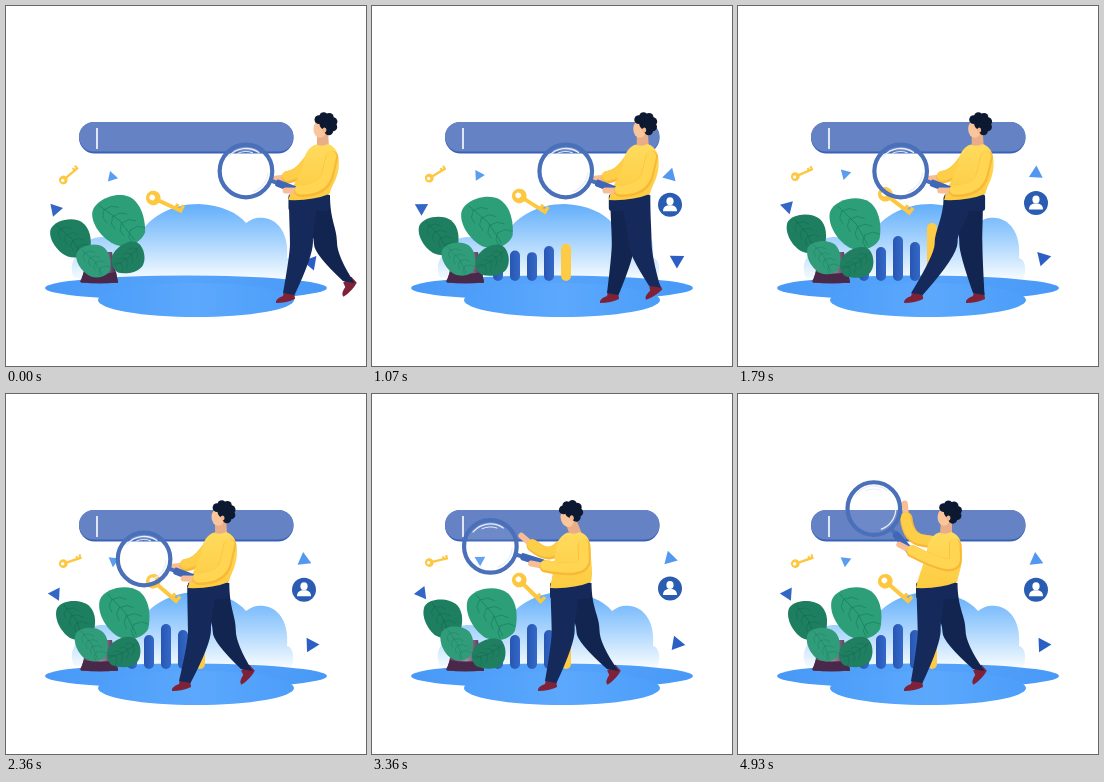
An HTML page with a canvas that plays this animation: 360x360 px, repeating every 5 s.

```html
<!DOCTYPE html>
<html lang="en">
<head>
<meta charset="utf-8">
<title>Search</title>
<style>
html, body { margin: 0; width: 100%; height: 100%; overflow: hidden; background: #fff; }
canvas { display: block; width: 360px; height: 360px; }
</style>
</head>
<body>
<canvas id="stage"></canvas>
<script>
const LOOP = 5000, WALK = 2450;
const canvas = document.getElementById('stage');
const c = canvas.getContext('2d');
const dpr = window.devicePixelRatio || 1;
canvas.width = canvas.height = 360 * dpr;

const rad = d => d * Math.PI / 180;
const mix = (a, b, k) => a + (b - a) * k;
const clamp = v => Math.max(0, Math.min(1, v));
const ease = p => (1 - Math.cos(Math.PI * clamp(p))) / 2;

function at(x, y, deg, draw, sx = 1, sy = sx) {
  c.save();
  c.translate(x, y);
  c.rotate(rad(deg));
  c.scale(sx, sy);
  draw();
  c.restore();
}
function fill(d, color) {
  c.fillStyle = color;
  c.fill(new Path2D(d), 'evenodd');
}
function oval(x, y, rx, ry, color) {
  c.fillStyle = color;
  c.beginPath();
  c.ellipse(x, y, rx, ry, 0, 0, 7);
  c.fill();
}
function box(x, y, w, h, r, color) {
  c.fillStyle = color;
  c.beginPath();
  c.roundRect(x, y, w, h, r);
  c.fill();
}
function line(points, width, color) {
  c.strokeStyle = color;
  c.lineWidth = width;
  c.lineCap = c.lineJoin = 'round';
  c.beginPath();
  points.forEach(p => c.lineTo(p[0], p[1]));
  c.stroke();
}
function blend(x0, y0, x1, y1, ...colors) {
  const g = c.createLinearGradient(x0, y0, x1, y1);
  colors.forEach((s, i) => g.addColorStop(i / (colors.length - 1), s));
  return g;
}

function triangle(x, y, r, deg, color) {
  at(x, y, deg, () => fill('M1 0L-.5 .866L-.5 -.866Z', color), r);
}

function key(x, y, deg, size) {
  at(x, y, deg, () => fill(
    'M7 -2A7.3 7.3 0 1 0 7 2L32 2L32 -6L28.5 -6L28.5 -2L26.5 -2L26.5 -5L23 -5L23 -2Z' +
    'M-4 0A2.8 2.8 0 1 1 1.6 0A2.8 2.8 0 1 1 -4 0Z', '#fdc740'), size);
}

function leaf(x, y, deg, sx, sy, color, vein) {
  at(x, y, deg, () => {
    fill('M-25 -12C-21 -25 3 -31 15 -23C26 -15 28 2 26 15C21 25 8 29 -3 25C-15 20 -28 2 -25 -12Z', color);
    line([[-17, -18], [2, 0], [14, 21]], .8, vein);
    for (let p = -13; p < 12; p += 8) {
      line([[p, p], [p + 8, p - 3], [p + 15, p - 1]], .7, vein);
      line([[p, p], [p - 2, p + 7], [p + 1, p + 13]], .7, vein);
    }
  }, sx, sy);
}

function scenery(t, k) {
  fill('M68 272C63 262 67 252 72 248C72 238 88 228 104 232C113 229 124 231 130 236' +
    'C140 211 165 198 193 198C215 199 232 207 240 217C246 212 252 211 258 212' +
    'C275 214 283 232 281 252C289 254 288 268 285 273Z',
    blend(0, 198, 0, 272, '#62aefb', '#a8d4fd', '#f4faff'));
  oval(180, 282, 141, 12.5, blend(39, 0, 321, 0, '#4899f7', '#56a4fb', '#4899f7'));
  oval(190, 294, 98, 17, blend(92, 0, 288, 0, '#4c9ef9', '#5ca8fd', '#4c9ef9'));

  [30, 34, 45, 39, 58].forEach((full, i) => {
    const x = 121 + 17 * i;
    const h = full * ease((t - 400) / (i % 2 ? 850 : 1135));
    if (h > .5) box(x, 275 - h, 10, h, Math.min(5, h / 2), i === 4 ? '#fdcb45' : blend(x, 0, x + 10, 0, '#2856b2', '#3469c9'));
  });

  box(73, 116, 214.5, 31.5, 15.7, '#3862b6');
  box(73, 116, 214.5, 29.5, 14.7, '#6482c4');
  box(90.2, 122, 1.6, 21, 0, '#fff');

  triangle(mix(106, 108, k), mix(171, 166, k), 6.2, mix(12, -32, k), '#5a9cf0');
  triangle(49.5, mix(203.5, 199, k), 7.7, mix(-11, -68, k), '#3267c6');
  triangle(305, mix(256.5, 249.5, k), 8.4, mix(-50, 10, k), '#2b5fc4');
  triangle(298, mix(172, 164.5, k), 8, mix(-58, -106, k), '#5297f0');
  key(57.3, mix(174, 168.5, k), mix(-40, -13, k), .6);
  key(147.3, mix(192, 186, k), mix(25, 45, k), 1);

  at(298, mix(201, 194.5, k), 0, () => {
    oval(0, 0, 12, 12, '#2a5cb2');
    oval(0, -3.6, 3.6, 4, '#fff');
    fill('M-7 6.5C-7 2 -4 1 -2 .5L2 .5C4 1 7 2 7 6.5Z', '#fff');
  });
}

function plant(k) {
  fill('M82 246L106 246L112 277L75 277Z', blend(78, 0, 110, 0, '#5d3d59', '#a592a6', '#4a2c50'));
  fill('M78 266Q94 269 110 266L112 276Q94 279 74 276Z', '#4a2849');
  const turn = 13 * k;
  leaf(64 + 6 * k, 232.5 - 8 * k, turn, .78, .72, '#1d7f5f', '#156a4f');
  leaf(112 + 7 * k, 215 + 5 * k, turn - 7, .98, .97, '#2c9f79', '#1a7f5f');
  leaf(122 - 5 * k, 251 + 8 * k, turn + 90, .61, .62, '#1f7f60', '#156a4f');
  leaf(87 - 3 * k, 255 - 6 * k, turn, .66, .62, '#309c79', '#1d8262');
}

// One step: the foot stands, swings forward, stands again; its heel rises behind the hip.
function foot(t, hip, from, to, begin, time) {
  const s = ease((t - begin) / time);
  const x = mix(from, to, s);
  const heel = clamp((x - hip - 16) / 16);
  return { x, y: 288 - 12 * heel - 7 * Math.sin(Math.PI * s), tilt: -35 * heel };
}

function leg(hip, { x, y, tilt }, color) {
  const reach = x - hip;
  const hx = hip + Math.max(-7, Math.min(7, reach * .3));
  const kx = hip + reach * .4, ky = 238;
  at(x, y, tilt, () => fill('M5 -3L6 5Q-2 9 -13 9Q-14 5 -6 2L-5 -3Z', '#7f2237'));
  c.fillStyle = color;
  c.beginPath();
  c.moveTo(hx - 14, 191);
  c.bezierCurveTo(hx - 14, 212, kx - 11, ky - 14, kx - 11, ky);
  c.quadraticCurveTo(kx - 11, ky + 10, x - 6, y - 1);
  c.lineTo(x + 5.5, y + 1);
  c.quadraticCurveTo(kx + 12, ky + 12, kx + 12, ky - 2);
  c.bezierCurveTo(kx + 12, ky - 16, hx + 14, 214, hx + 14, 189);
  c.fill();
}

function arm(shoulder, elbow, hand, color) {
  const dx = elbow[0] - hand[0], dy = elbow[1] - hand[1], d = Math.hypot(dx, dy);
  const wrist = [hand[0] + dx / d * 15, hand[1] + dy / d * 15];
  line([wrist, hand], 6, '#f8bd94');
  const path = new Path2D();
  path.moveTo(...wrist);
  path.quadraticCurveTo(...elbow, mix(elbow[0], shoulder[0], .5), mix(elbow[1], shoulder[1], .5));
  path.lineTo(...shoulder);
  c.lineCap = c.lineJoin = 'round';
  c.lineWidth = 12.5;
  c.strokeStyle = '#f8b838';
  c.stroke(path);
  c.translate(-.6, -1.2);
  c.lineWidth = 10;
  c.strokeStyle = color;
  c.stroke(path);
  c.translate(.6, 1.2);
}

function head(x, tilt) {
  at(x, 138, tilt, () => {
    fill('M-5 -12L6 -14L7 2Q0 4 -5 1Z', '#e9ad88');
    oval(-2, -15, 6.5, 8.8, '#fbc59b');
    oval(4, -20, 6.5, 6, '#0d1831');
    for (let i = 0; i < 6; i++) {
      const a = rad(42 * i - 145);
      oval(3.5 + 8 * Math.cos(a), -20 + 7.5 * Math.sin(a), 4.4, 4.4, '#0d1831');
    }
    oval(2.5, -14, 2, 2.6, '#f4b78d');
  });
}

function torso(n, h) {
  c.fillStyle = blend(0, 138, 0, 192, '#ffdb5e', '#fdcc42');
  c.beginPath();
  c.moveTo(n - 6, 138.5);
  c.bezierCurveTo(n - 13, 141, n - 17, 147, n - 18, 155);
  c.bezierCurveTo(n - 20, 168, h - 17, 178, h - 20.5, 194);
  c.quadraticCurveTo(h + 3, 195, h + 20.5, 188);
  c.bezierCurveTo(h + 23, 178, n + 17, 172, n + 17, 157);
  c.bezierCurveTo(n + 17, 147, n + 13, 140, n + 6, 138);
  c.quadraticCurveTo(n, 141, n - 6, 138.5);
  c.fill();
}

function glass(x, y, deg) {
  oval(x, y, 26, 26, 'rgba(255,255,255,.06)');
  const arc = (from, to, r, width, color) => {
    c.lineCap = 'round';
    c.lineWidth = width;
    c.strokeStyle = color;
    c.beginPath();
    c.arc(x, y, r, rad(from), rad(to));
    c.stroke();
  };
  arc(-140, -55, 22.5, 1.3, '#e8eefb');
  arc(-115, -70, 19.5, 1, '#e8eefb');
  arc(5, 70, 22, 1.3, '#e8eefb');
  at(x, y, deg, () => {
    box(27, -2, 8, 4, 0, '#4a70b9');
    box(32, -3.6, 25, 7.2, 2, '#4066b6');
  });
  arc(0, 360, 26.3, 4.2, '#4a70b9');
}

function man(t) {
  const walk = clamp(t / WALK);
  const lean = ease((t - WALK) / 900);
  const lift = ease((t - 2500) / 2600);
  const late = lift * lift;

  const hip = mix(303, 198.5, walk);
  const neck = mix(316, 210.2, walk) - 10 * lean + 7 * lift;
  const x = mix(240, 134.2, walk) - 17 * lean + 19 * late;
  const y = mix(165, 114, lift);
  const angle = 21 - 14 * lean + 43 * lift;
  const cos = Math.cos(rad(angle)), sin = Math.sin(rad(angle));
  const farElbow = [neck - 24 - 13 * lift, 170 - 26 * lift];
  const farHand = [x + 27 + 4 * lean, y + 8 - 19 * lean + 6 * late];
  const nearElbow = [neck + 2 + 9 * lean, 185 - 5 * lean];
  const nearHand = [x + cos * 44 - sin * 4, y + sin * 44 + cos * 4];

  leg(hip, foot(t, hip, 343, 241, 0, 800), '#122450');
  leg(hip, foot(t, hip, 283, 179, 1070, 740), '#152a5b');
  box(hip - 20.5, 188, 41, 17, 3, '#152a5b');
  arm([neck - 8, 149], farElbow, farHand, '#fdce48');
  head(neck, -20 * lean + 24 * late);
  torso(neck, hip);
  glass(x, y, angle);
  arm([neck + 10, 151], nearElbow, nearHand, '#ffd552');
}

function render(t) {
  // slow drift shared by all floating parts
  const k = (Math.cos(Math.PI * (t - 3640) / 4600) + .793) / 1.793;
  c.setTransform(dpr, 0, 0, dpr, 0, 0);
  c.fillStyle = '#fff';
  c.fillRect(0, 0, 360, 360);
  scenery(t, k);
  plant(k);
  man(t);
}

const start = performance.now();
function tick() {
  render((performance.now() - start) % LOOP);
  requestAnimationFrame(tick);
}
tick();
</script>
</body>
</html>
```
